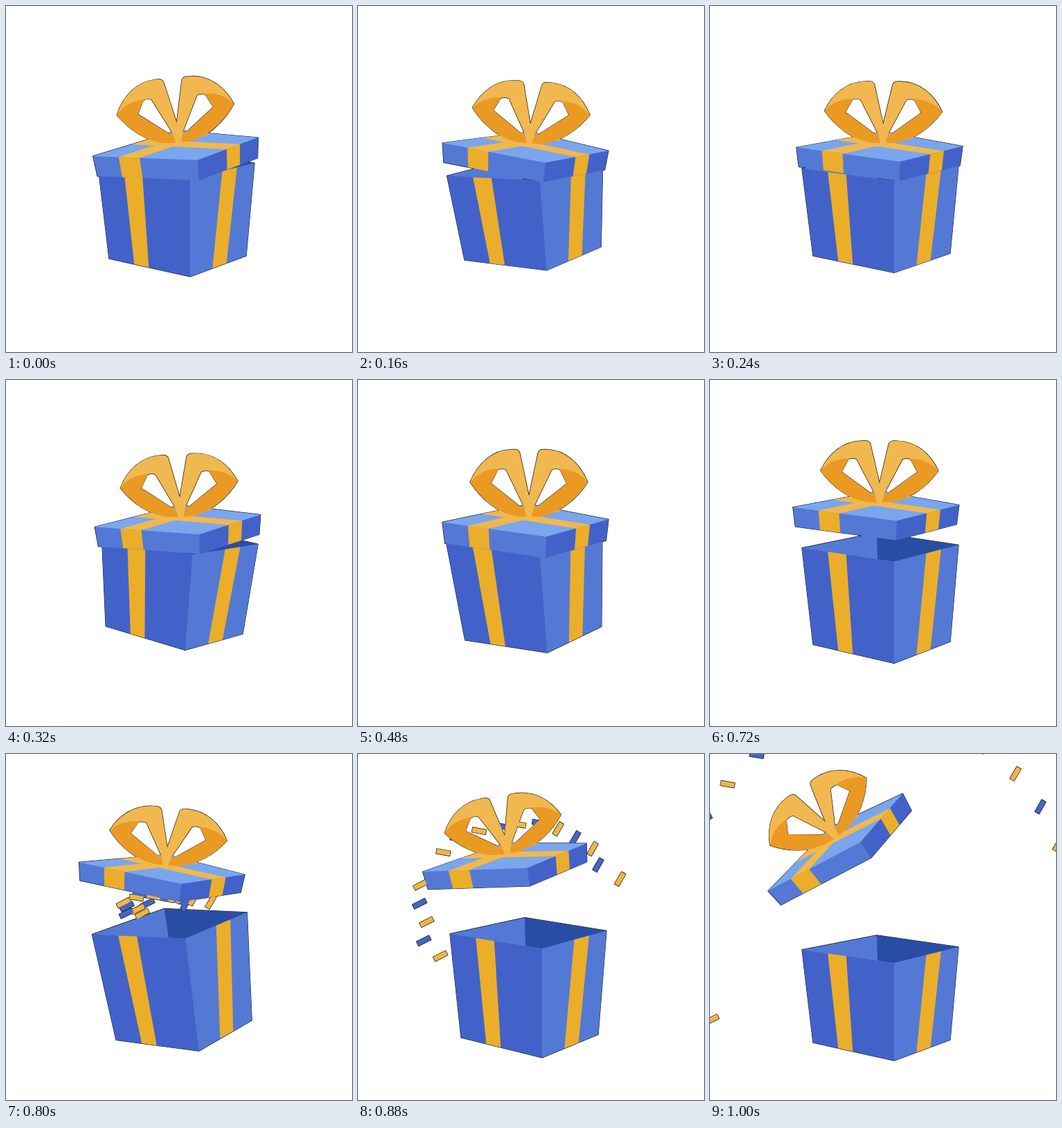
These frames come from a looping animation (500 px wide and 500 px high, 1.04 s). An HTML page with a canvas:

```html
<!DOCTYPE html>
<html lang="en">
<head>
<meta charset="utf-8">
<title>Gift box</title>
<style>
html, body { margin: 0; width: 100%; height: 100%; overflow: hidden; background: #fff; }
canvas { display: block; }
</style>
</head>
<body>
<canvas id="stage" width="500" height="500"></canvas>
<script>
const ctx = document.getElementById('stage').getContext('2d');
const LOOP = 1040, STEP = 40, BEAT = 160, LIFT = 640, BURST = 800, END = 1000;
const DARK = '#4262c9', MID = '#5479d5', LIGHT = '#7aa6ed', DEEP = '#2a4da4';
const GOLD = '#ebae2b', PALE = '#f0b84e', AMBER = '#ea9a23';

const clamp = u => Math.max(0, Math.min(1, u));
const mix = (a, b, k) => a + (b - a) * k;
const noise = i => { const n = Math.sin(i * 12.9898) * 43758.5453; return n - Math.floor(n); };

// Motion: the box rocks once every two beats, then the lid pops off
const rock = t => Math.cos(Math.PI * t / BEAT) * clamp(t / BEAT);
const launch = t => clamp((t - LIFT) / (END - LIFT)) ** .85;

// Smooth curve through one value per beat; the last beat is longer
function track(keys, t) {
  const pos = t < BURST ? t / BEAT : BURST / BEAT + (t - BURST) / (END - BURST);
  const i = Math.min(Math.floor(pos), keys.length - 2), u = pos - i;
  const p = keys[i], q = keys[i + 1], before = keys[i - 1] ?? p, after = keys[i + 2] ?? q;
  const m = (q - before) / 2, n = (after - p) / 2;
  return p + u * (m + u * (3 * (q - p) - 2 * m - n + u * (2 * (p - q) + m + n)));
}

const bodyPose = t => [
  248,
  298 + 52 * launch(t),
  rock(t) * (4.4 + 5 * launch(t)) * (1 - clamp((t - BURST) / (END - BURST))),
  track([1, .92, .98, 1.05, .92, 1.16, 1], t)
];

const lidPose = t => [
  245 + 3 * rock(t) - 66 * launch(t) ** 2,
  203.5 - 76 * launch(t),
  track([-5.5, 3.6, -3.3, 0, -8.8, 5.1, -35], t),
  track([.965, .92, .93, 1, .98, .86, .9], t)
];

function place([x, y, deg, stretch], draw) {
  ctx.save();
  ctx.translate(x, y);
  ctx.rotate(deg * Math.PI / 180);
  ctx.scale(1, stretch);
  draw();
  ctx.restore();
}

function poly(...points) {
  const path = new Path2D();
  points.forEach(p => path.lineTo(...p));
  path.closePath();
  return path;
}

const along = (a, b, k) => [mix(a[0], b[0], k), mix(a[1], b[1], k)];

// Ribbon between a stretch of edge ab and a stretch of edge cd
const ribbon = (a, b, [s, e], c, d, [s2, e2] = [s, e]) =>
  poly(along(a, b, s), along(a, b, e), along(c, d, e2), along(c, d, s2));

function fill([color, path]) {
  ctx.fillStyle = color;
  ctx.fill(path, 'evenodd');
}

function makeBody() {
  const left = [-115, -67], back = [-7, -88], right = [111, -71], front = [18, -48];
  const footLeft = [-99, 67], footFront = [18, 93], footRight = [99, 63];
  const shape = poly(left, back, right, footRight, footFront, footLeft);
  return {
    shape,
    inside: [[MID, shape], [DEEP, poly(back, right, front, along(left, front, .82))]],
    faces: [
      [MID, poly(front, right, footRight, footFront)],
      [DARK, poly(left, front, footFront, footLeft)],
      [GOLD, ribbon(left, front, [.28, .48], footLeft, footFront, [.31, .49])],
      [GOLD, ribbon(front, right, [.5, .73], footFront, footRight, [.4, .65])]
    ]
  };
}

function makeLid() {
  const left = [-120, 2], back = [5, -24], right = [120, -2], front = [30, 23];
  const [rimLeft, rimFront, rimRight] = [left, front, right].map(([x, y]) => [x * .97, y + 30.5]);
  const near = [.245, .445], side = [.48, .7];
  const shape = poly(left, back, right, rimRight, rimFront, rimLeft);
  return {
    shape,
    faces: [
      [MID, shape],
      [LIGHT, poly(left, back, right, front)],
      [DARK, poly(front, right, rimRight, rimFront)],
      [PALE, ribbon(left, front, near, back, right, [.22, .41])],
      [PALE, ribbon(front, right, side, left, back, [.46, .66])],
      [GOLD, ribbon(left, front, near, rimLeft, rimFront)],
      [GOLD, ribbon(front, right, side, rimFront, rimRight)]
    ]
  };
}

const body = makeBody(), lid = makeLid();

// One half of the bow; the other is its mirror image
const bow = new Path2D(
  'M85-56C73-84 52-102 26-103L19-103Q14-102 13-97L0-36L-1-34L-1-5L8-6C44-6 72-36 85-56Z' +
  'M55-54L45-74Q39-77 33-74L7-20L12-20Z');
const bowShade = new Path2D('M85-56Q68-76 44-75L55-54L12-20L7-20L4-6L8-6C44-6 72-36 85-56Z');

function eachBow(draw) {
  for (const side of [1, -1]) {
    ctx.save();
    ctx.translate(5, 0);
    ctx.scale(side, 1);
    draw();
    ctx.restore();
  }
}

// Confetti fans out from the box: a quick puff, then a fast flight
const scrap = poly([-10, -3.5], [10, -3.5], [10, 3.5], [-10, 3.5]);

function eachScrap(t, draw) {
  if (t < BURST - STEP) return;
  const puff = clamp((t - BURST + 2 * STEP) / (2 * STEP));
  const flight = clamp((t - BURST) / (END - BURST));
  for (let i = 0; i < 17; i++) {
    const deg = 20 + 12 * i, a = deg * Math.PI / 180;
    const reach = puff * (.4 + .6 * noise(i + 1));
    const x = mix(235 + 68 * reach * Math.cos(a), 240 + 280 * Math.cos(a), flight);
    const y = mix(mix(255, 222, puff) - 25 * reach * Math.sin(a), 230 - 290 * Math.sin(a), flight);
    const tilt = [-60, 10, -27][Math.floor(deg / 71)];
    place([x, y, tilt, 1], () => draw(i % 2 ? '#4565c4' : '#efb545'));
  }
}

function render(t) {
  const bodyAt = bodyPose(t), lidAt = lidPose(t);
  ctx.clearRect(0, 0, 500, 500);

  // Outlines first, so only the outer rim stays visible
  ctx.strokeStyle = '#111';
  ctx.lineWidth = 1.4;
  ctx.lineJoin = 'round';
  place(bodyAt, () => ctx.stroke(body.shape));
  eachScrap(t, () => ctx.stroke(scrap));
  place(lidAt, () => {
    ctx.stroke(lid.shape);
    eachBow(() => ctx.stroke(bow));
  });

  place(bodyAt, () => body.inside.forEach(fill));
  eachScrap(t, color => fill([color, scrap]));
  place(bodyAt, () => body.faces.forEach(fill));
  place(lidAt, () => {
    lid.faces.forEach(fill);
    eachBow(() => [[PALE, bow], [AMBER, bowShade]].forEach(fill));
  });
}

const start = performance.now();
function tick() {
  const t = (performance.now() - start) % LOOP;
  render(Math.floor(t / STEP) * STEP);
  requestAnimationFrame(tick);
}
tick();
</script>
</body>
</html>
```
